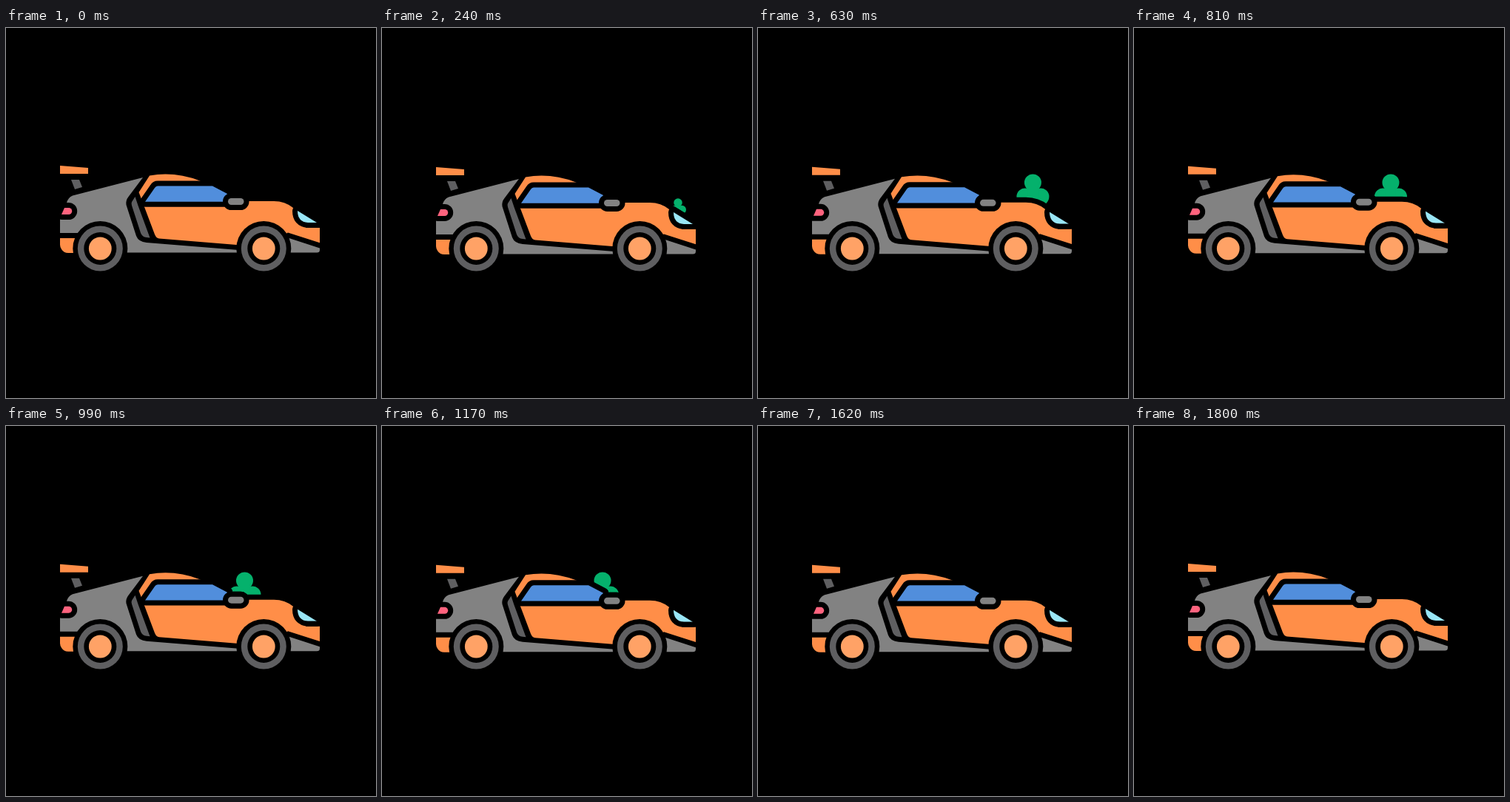
Recreate the animation shown at these times as an HTML page with a canvas. Size 500x500 px, loop 1.83 s.

```html
<!DOCTYPE html>
<html lang="en">
<head>
<meta charset="utf-8">
<title>Car</title>
<style>
html, body { margin: 0; width: 100%; height: 100%; overflow: hidden; background: #000; }
canvas { display: block; width: 500px; height: 500px; }
</style>
</head>
<body>
<canvas id="stage" width="500" height="500"></canvas>
<script>
const ctx = document.getElementById('stage').getContext('2d');
const LOOP = 1830, STEP = 30, LINE = 7;
const ORANGE = '#ff8e48', GRAY = '#828282', DARK = '#5f5f61', GREEN = '#05b16c';
const clamp = v => Math.max(0, Math.min(1, v));

// Body panels, painted in order; "edge" panels get a black outline of their own.
const panels = [
  { fill: ORANGE, d: 'M73 186L111 189V197H73Z' },
  { fill: DARK, d: 'M88 205H99L103 215L93 218Z' },
  { fill: GRAY, d: 'M73 277V257L82 236Q84 229 90 226.5L185 202L165.500 228Q161.500 233 162.500 239L176 281Q179 289 190 290L314 300V303.5H163L127 277Z' },
  { fill: ORANGE, d: 'M73 284H100V304H84Q78 304 75 299Q73 296 73 293Z' },
  { fill: DARK, d: 'M174.5 228L170 235Q169 237 170 240L182 277Q184 282.500 190 283L194.500 283.500L178.500 240Z' },
  { fill: ORANGE, d: 'M194 199.500Q228 193.500 262 206.500L298 226V234H362Q377 234 388 243L424 265V290.300L381 276.500L348 296L207 284.500Q203 284 201 279L179.500 222Z' },
  { fill: GRAY, d: 'M381 283.500L424 297.500V300Q424 303.500 420 303.500H381Z' },
  { fill: '#518edc', edge: true, d: 'M205 213.500H279L299 224L296 234.700H188L201 216Q202.500 213.500 205 213.500Z' },
  { fill: '#99e6f6', edge: true, d: 'M394 247L420 263H408Q394 262 394 247Z' },
  { fill: '#ff637e', edge: true, d: 'M79 243H84.700A4.500 4.500 0 0 1 84.700 252H75Z' },
  { fill: GRAY, edge: true, d: 'M304.500 230H317A4.500 4.500 0 0 1 317 239H304.500A4.500 4.500 0 0 1 304.500 230Z' }
].map(p => ({ ...p, path: new Path2D(p.d) }));

const lampTail = new Path2D('M405 266.500H430');

function disc(x, y, r, color) {
  ctx.fillStyle = color;
  ctx.beginPath();
  ctx.arc(x, y, r, 0, Math.PI * 2);
  ctx.fill();
}

function outline(path, width = LINE * 2) {
  ctx.strokeStyle = '#000';
  ctx.lineWidth = width;
  ctx.stroke(path);
}

// Grows behind the nose, then slides back until the roof hides it.
function bush(t) {
  const size = clamp((t - 60) / 360);
  if (!size) return;
  const color = t < 1410 ? GREEN : DARK;
  ctx.save();
  ctx.translate(400 - 0.136 * Math.max(0, t - 420), 263);
  ctx.scale(size, size);
  for (const [x, y] of [[0, -54], [-10.5, -35], [10.5, -35]]) disc(x, y, 11.5, color);
  ctx.fillRect(-7, -50, 14, 20);
  ctx.restore();
}

function body(t) {
  ctx.save();
  ctx.translate(0, 1 - Math.cos(t / 450 * Math.PI * 2));
  ctx.lineJoin = 'round';
  panels.forEach(p => outline(p.path));
  ctx.beginPath();
  ctx.rect(72.5, 180, 352, 130);
  ctx.clip();
  for (const p of panels) {
    if (p.edge) outline(p.path);
    ctx.fillStyle = p.fill;
    ctx.fill(p.path);
  }
  outline(lampTail, LINE);
  ctx.restore();
}

function wheel(x) {
  disc(x, 298, 37, '#000');
  disc(x, 298, 30.5, DARK);
  disc(x, 298, 22, '#000');
  disc(x, 298, 15.4, '#ffa266');
}

function draw(now) {
  const t = Math.floor(now % LOOP / STEP) * STEP;
  ctx.fillStyle = '#000';
  ctx.fillRect(0, 0, 500, 500);
  if (t < 1560) bush(t);
  body(t);
  wheel(127.3);
  wheel(348.3);
  requestAnimationFrame(draw);
}

draw(0);
</script>
</body>
</html>
```
